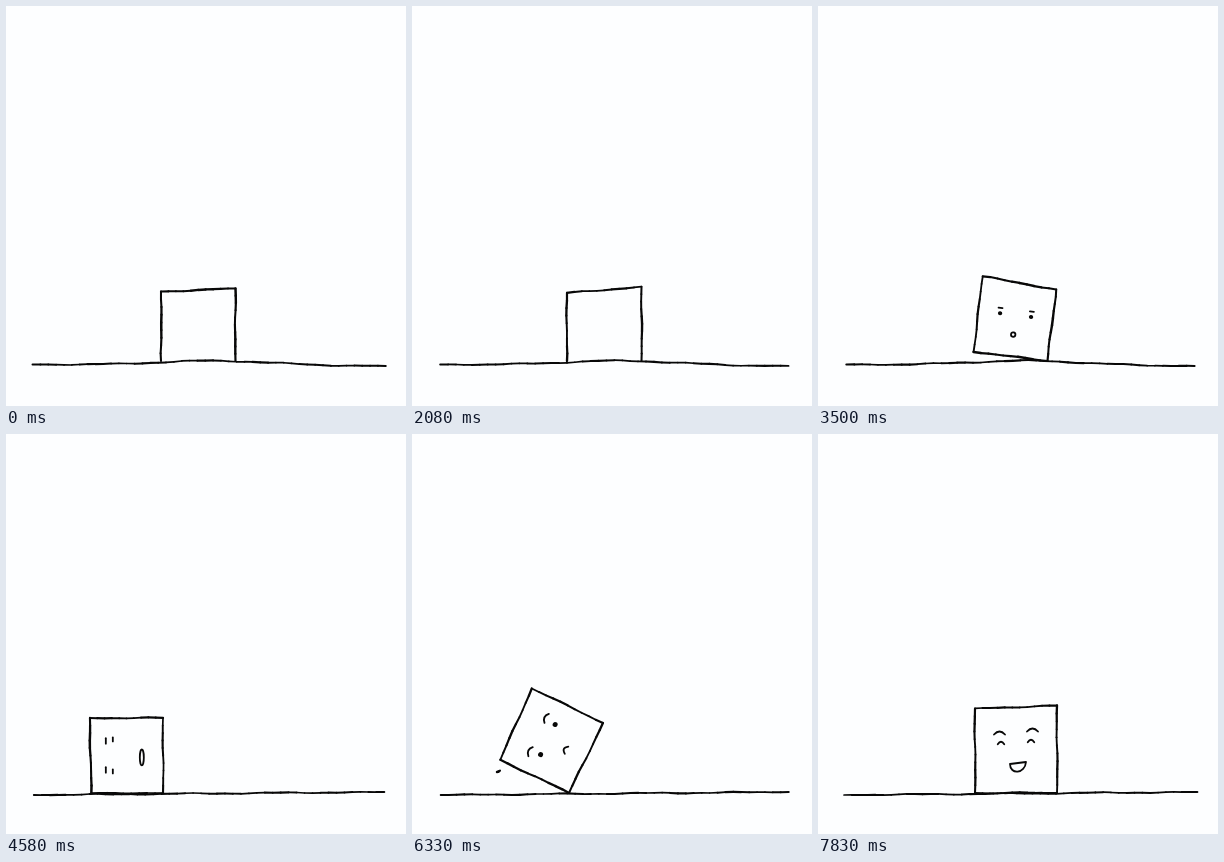
An HTML page with a canvas for the animation above (7.91 s loop, 400x400 px).

```html
<!DOCTYPE html>
<html lang="en">
<meta charset="utf-8">
<title>Box</title>
<style>
  html, body { margin: 0; height: 100%; overflow: hidden; background: #fdfeff; }
  canvas { display: block; }
</style>
<canvas id="stage" width="400" height="400"></canvas>
<script>
const ctx = document.getElementById('stage').getContext('2d');
const LOOP = 7910, STEPS = 95;
const { sin, abs, exp, hypot, PI } = Math;

const ramp = (n, from, to) => Math.min(1, Math.max(0, (n - from) / (to - from)));
const ease = p => p * p * (3 - 2 * p);
const mix = (a, b, p) => a + (b - a) * p;
const bump = (n, from, to) => sin(PI * ramp(n, from, to));
const ringing = (u, size, decay, speed) => size * exp(-decay * u) * sin(speed * u);

let seed = 1;
function random() {
  seed = (seed * 16807) % 2147483647;
  return seed / 2147483647;
}

// Traces a path given by p in 0..1 with slow wobble and uneven pressure.
function sketch(path, length, weight) {
  const a = random() * 6.3, b = random() * 6.3;
  const parts = Math.max(4, Math.ceil(length / 8));
  const [x1, y1] = path(0), [x2, y2] = path(1);
  const point = p => {
    const [x, y] = path(p), s = p * length;
    const off = .45 * Math.min(1, p * 8, (1 - p) * 8) * (sin(s * .07 + a) + .5 * sin(s * .19 + b));
    return [x + (y1 - y2) / length * off, y + (x2 - x1) / length * off];
  };
  for (let i = 0; i < parts; i++) {
    ctx.lineWidth = weight + .25 * sin(i * .9 + b);
    ctx.beginPath();
    ctx.moveTo(...point(i / parts));
    ctx.lineTo(...point((i + 1) / parts));
    ctx.stroke();
  }
}

function line(x1, y1, x2, y2) {
  sketch(p => [mix(x1, x2, p), mix(y1, y2, p)], hypot(x2 - x1, y2 - y1), 1.9 + random() * .4);
}

function dash(x, y, w) {
  ctx.beginPath();
  ctx.moveTo(x - w / 2, y);
  ctx.lineTo(x + w / 2, y);
  ctx.stroke();
}

function arc(x, y, w, h) {
  ctx.beginPath();
  ctx.moveTo(x - w / 2, y + h / 2);
  ctx.quadraticCurveTo(x, y - h * 1.5, x + w / 2, y + h / 2);
  ctx.stroke();
}

function oval(x, y, rx, ry, fill) {
  ctx.beginPath();
  ctx.ellipse(x, y, rx, ry, 0, 0, 2 * PI);
  fill ? ctx.fill() : ctx.stroke();
}

const bothSides = draw => [-1, 1].forEach(draw);

const moods = {
  surprised() {
    bothSides(s => {
      dash(s * 15.8, -10, 4);
      oval(s * 15.6, -4.6, 2.2, 2, true);
    });
    oval(0, 15, 2.2, 2.2);
  },
  stunned() {
    bothSides(s => {
      dash(s * 14.5, -21, 5.5);
      dash(s * 16, -14, 4);
    });
    oval(-2, 15, 8, 2);
  },
  straining() {
    bothSides(s => {
      arc(s * 18.5, -15, 10, 2.5);
      oval(s * 16.7, -3.5, 2.5, 2.5, true);
    });
    arc(-1.5, 16.5, 8, 3);
  },
  happy() {
    bothSides(s => {
      arc(s * 16.5, -18.5 - s * 1.5, 11, 3);
      arc(s * 15, -8 - s, 6.5, 2.5);
    });
    ctx.beginPath();
    ctx.moveTo(-6, 14);
    ctx.lineTo(10, 12);
    ctx.bezierCurveTo(9, 24, -6, 25, -6, 14);
    ctx.stroke();
  }
};

const moodAt = n => n < 36 ? null : n < 45 ? 'surprised' : n < 60 ? 'stunned' : n < 80 ? 'straining' : 'happy';

// The top edge shoots up, rings and sways; the second shot is calmer and leans the other way.
function pose(n) {
  const second = n >= 30;
  const u = second ? n - 30 : n;
  const stretch = ringing(u, 368, .3, .55);
  const growth = ramp(n, 40, 94) ** 2;
  const height = 71 + 15 * growth + (stretch < 0 ? stretch / 4 : stretch);
  const sway = 1.5 + ringing(u, second ? -15 : 30, .1, .6);
  const settled = ease(ramp(n, 42, 50));
  return {
    x: 155 + 2 * settled,
    y: 355 + 4 * settled - 78 * bump(n, 81, 88),
    w: 74.5 + 7.5 * growth,
    left: height - sway,
    right: height + sway,
    tilt: 7.3 * bump(n, 40, 45) - 90 * ease(ramp(n, 45, 50))
      + 12 * abs(sin(2 * PI * ramp(n, 60, 70))) + 90 * ramp(n, 72, 80) ** 1.8
  };
}

function drawBox(n) {
  const { x, y, w, left, right, tilt } = pose(n);
  const pivot = tilt > 0 ? w : 0;

  ctx.save();
  ctx.translate(x + pivot, y);
  ctx.rotate(tilt * PI / 180);
  ctx.translate(-pivot, 0);
  line(0, 0, 0, -left);
  line(0, -left, w, -right);
  line(w, -right, w, 0);

  const mood = moodAt(n);
  if (mood) {
    line(0, 0, w, 0);
    ctx.translate(w / 2, -(left + right) / 4);
    ctx.lineWidth = 1.8;
    moods[mood]();
  }
  ctx.restore();
}

// A low hill under the box that flattens once it has rolled.
function drawGround(n) {
  const k = ease(ramp(n, 42, 50));
  const start = 26 + random() * 3, end = 376 + random() * 4;
  sketch(p => {
    const x = mix(start, end, p);
    const hill = 4.5 * (1 - k) * exp(-(((x - 210) / 80) ** 2));
    return [x, mix(358.5, 361, k) + mix(1.5, -3, k) * p - hill];
  }, end - start, 1.9);
}

function drawScene(n) {
  seed = 7919 * (n + 3);
  ctx.fillStyle = '#fdfeff';
  ctx.fillRect(0, 0, 400, 400);
  ctx.strokeStyle = ctx.fillStyle = '#080808';
  ctx.lineCap = ctx.lineJoin = 'round';
  drawGround(n);
  drawBox(n);
  if (n > 73 && n < 79) line(85, 338, 88, 336.5);
}

// Two short pauses hold the drawing still.
const hold = n => n === 10 ? 9 : n === 58 || n === 59 ? 57 : n;

const origin = performance.now();
function tick() {
  const t = (performance.now() - origin) % LOOP;
  drawScene(hold(Math.min(STEPS - 1, Math.floor((t + 5) * STEPS / LOOP))));
  requestAnimationFrame(tick);
}
tick();
</script>
</html>
```
